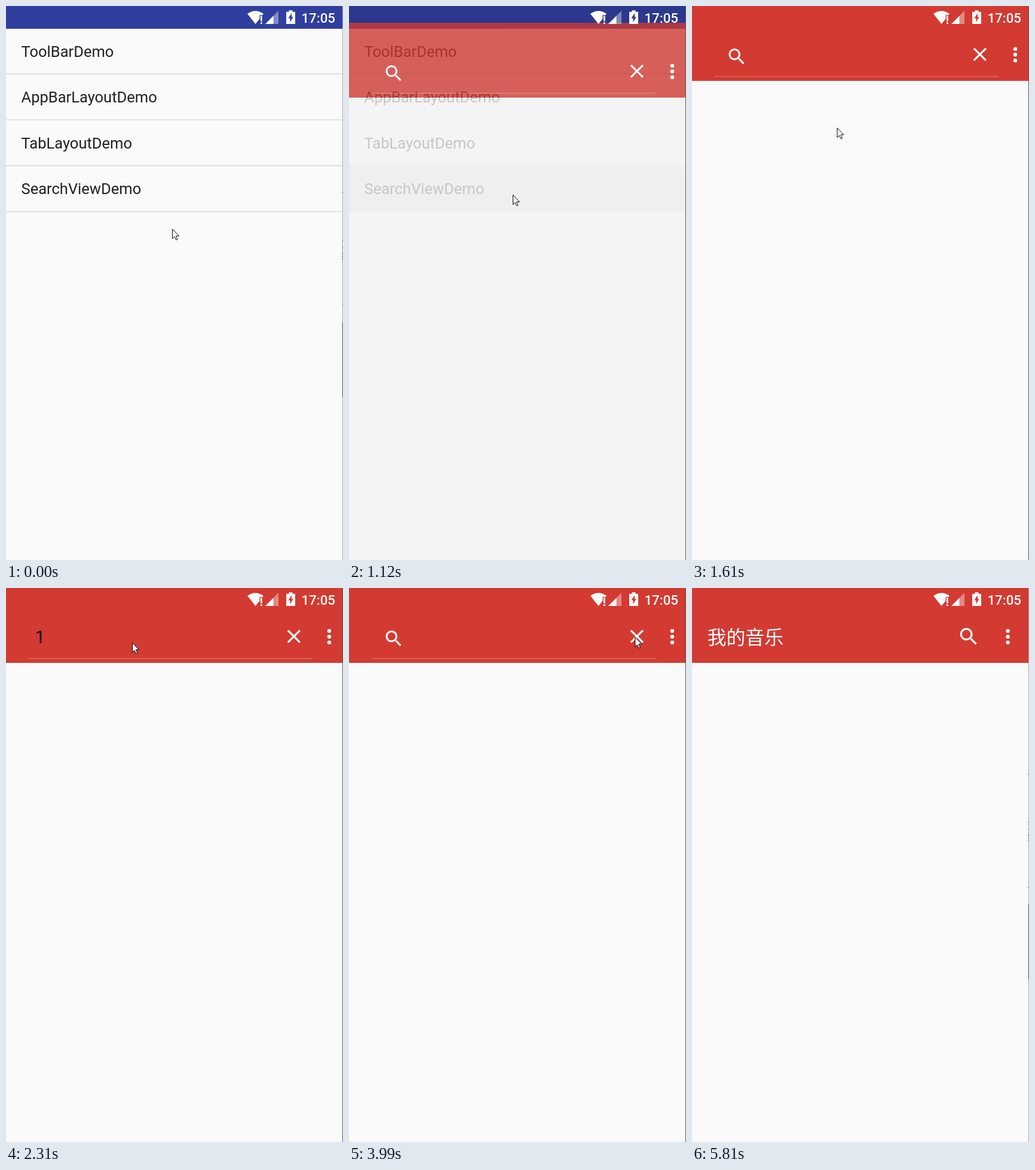
Animation of 564 by 925 pixels, one loop 5.88 s. Source, as an HTML page:

```html
<!DOCTYPE html>
<html lang="en">
<head>
<meta charset="utf-8">
<title>Search view demo</title>
<style>
  html, body { margin: 0; width: 100%; height: 100%; overflow: hidden; background: #000; }
  svg { display: block; width: 564px; height: 925px; }
  text { font-family: Roboto, sans-serif; white-space: pre; }
  .rows text { font-size: 25.53px; fill: #212121; }
  .clock { font-size: 22.3px; font-weight: 500; text-anchor: end; }
  .query { font-size: 28.7px; fill: #000; }
  .title { font-family: "Noto Sans CJK SC", "Noto Sans CJK", sans-serif; font-size: 31.9px; }
  .white { fill: #fff; }

  /* One loop is 84 ticks of 70 ms */
  .anim { animation: 5.88s step-end infinite; }

  .home { animation-name: dim; }
  @keyframes dim {
    0% { opacity: 1; }
    19.0476% { opacity: .9; }
    20.2381%, 100% { opacity: .8; }
  }

  .press { animation-name: press; }
  @keyframes press {
    0% { visibility: hidden; }
    14.2857%, 100% { visibility: visible; }
  }

  .ripple { animation-name: ripple; }
  @keyframes ripple {
    0% { r: 0; }
    14.2857% { r: 23px; }
    15.4762% { r: 95px; }
    16.6667% { r: 190px; }
    17.8571%, 100% { r: 300px; }
  }

  .screen { animation-name: enter; }
  @keyframes enter {
    0% { opacity: 0; transform: translateY(74px); }
    19.0476% { opacity: .77; transform: translateY(28px); }
    20.2381% { opacity: .97; transform: translateY(7px); }
    21.4286%, 100% { opacity: 1; transform: none; }
  }

  .field { animation-name: field; }
  @keyframes field {
    0% { visibility: visible; }
    77.381%, 100% { visibility: hidden; }
  }

  .hint { animation-name: hint; }
  @keyframes hint {
    0% { visibility: visible; }
    39.2857% { visibility: hidden; }
    64.2857% { visibility: visible; }
    77.381%, 100% { visibility: hidden; }
  }

  .d1 { animation-name: d1; }
  .d2 { animation-name: d2; }
  .d3 { animation-name: d3; }
  @keyframes d1 {
    0%, 64.2857%, 100% { visibility: hidden; }
    39.2857% { visibility: visible; }
  }
  @keyframes d2 {
    0%, 64.2857%, 100% { visibility: hidden; }
    44.0476% { visibility: visible; }
  }
  @keyframes d3 {
    0%, 64.2857%, 100% { visibility: hidden; }
    47.619% { visibility: visible; }
  }

  .closed { animation-name: closed; }
  @keyframes closed {
    0% { visibility: hidden; }
    77.381%, 100% { visibility: visible; }
  }

  .edge { animation-name: edge; }
  @keyframes edge {
    0%, 98.8095%, 100% { visibility: hidden; }
    5.9524% { visibility: visible; }
  }

  .shown { animation-name: shown; }
  @keyframes shown {
    0% { visibility: visible; }
    91.6667%, 100% { visibility: hidden; }
  }

  .cursor { animation: move 5.88s infinite; }
  @keyframes move {
    0%, 5.9524% { transform: translate(278px, 372px); animation-timing-function: steps(6, start); }
    13.0952%, 23.8095% { transform: translate(274px, 315px); animation-timing-function: steps(8, start); }
    33.3333%, 47.619% { transform: translate(211px, 91px); animation-timing-function: steps(5, start); }
    53.5714%, 54.7619% { transform: translate(465px, 90px); animation-timing-function: steps(3, start); }
    58.3333%, 59.5238% { transform: translate(470px, 90px); animation-timing-function: steps(3, start); }
    63.0952%, 64.2857% { transform: translate(473px, 86px); animation-timing-function: steps(3, start); }
    67.8571% { transform: translate(480px, 83px); animation-timing-function: steps(3, start); }
    71.4286%, 89.2857% { transform: translate(475px, 79px); animation-timing-function: steps(2, start); }
    91.6667%, 100% { transform: translate(503px, 562px); }
  }
</style>
</head>
<body>
<svg viewBox="0 0 564 925" xmlns="http://www.w3.org/2000/svg">
  <defs>
    <clipPath id="row"><rect y="267.5" width="563" height="75.5"/></clipPath>
    <path id="lens" d="M15.5 14h-.79l-.28-.27C15.41 12.59 16 11.11 16 9.5 16 5.91 13.09 3 9.5 3S3 5.91 3 9.5 5.91 16 9.5 16c1.61 0 3.09-.59 4.23-1.57l.27.28v.79l5 4.99L20.49 19l-4.99-5zm-6 0C7.01 14 5 11.99 5 9.5S7.01 5 9.5 5 14 7.01 14 9.5 11.99 14 9.5 14z"/>
    <g id="dots">
      <circle cy="71.7" r="3.2"/>
      <circle cy="81.3" r="3.2"/>
      <circle cy="90.9" r="3.2"/>
    </g>
  </defs>

  <g class="home anim">
    <rect width="564" height="925" fill="#fafafa"/>
    <rect width="564" height="38" fill="#303f9f"/>
    <g clip-path="url(#row)">
      <rect class="press anim" y="267" width="564" height="77" fill="#f3f3f3"/>
      <circle class="ripple anim" cx="274" cy="314" r="0" fill="#e6e6e6"/>
    </g>
    <path d="M0 113.4H564M0 190H564M0 266.6H564M0 343.2H564" stroke="#dadada" stroke-width="1.6"/>
    <g class="rows">
      <text x="25.5" y="84.5">ToolBarDemo</text>
      <text x="25.5" y="161.1">AppBarLayoutDemo</text>
      <text x="25.5" y="237.7">TabLayoutDemo</text>
      <text x="25.5" y="314.3">SearchViewDemo</text>
    </g>
  </g>

  <g class="screen anim">
    <rect width="564" height="925" fill="#fafafa"/>
    <rect width="564" height="125" fill="#d33a31"/>
    <g class="field anim white">
      <rect x="38" y="117" width="475" height="1.2" opacity=".28"/>
      <path transform="translate(462.7 61.7) scale(1.5957)" d="M19 6.41 17.59 5 12 10.59 6.41 5 5 6.41 10.59 12 5 17.59 6.41 19 12 13.41 17.59 19 19 17.59 13.41 12z"/>
      <use href="#dots" x="541"/>
    </g>
    <g class="hint anim white"><use href="#lens" transform="translate(57 66.5) scale(1.496)"/></g>
    <text class="query" x="49" y="91.7"><tspan class="d1 anim">1</tspan><tspan class="d2 anim">2</tspan><tspan class="d3 anim">3</tspan></text>
    <g class="closed anim white">
      <text class="title" x="25.5" y="94">我的音乐</text>
      <use href="#lens" transform="translate(444 62) scale(1.5957)"/>
      <use href="#dots" x="528.6"/>
    </g>
  </g>

  <!-- Status bar -->
  <g class="white">
    <path d="M417.5 30 404 13Q417.5 3.5 431 13L429.4 15H424.5V21.5Z"/>
    <path d="M426 16h2.7v9.5h-2.7zM426 27.3h2.7v2.7h-2.7z"/>
    <path d="M434 30 456 8V30Z" opacity=".4"/>
    <path d="M434 30 447.5 16.5V30Z"/>
    <path fill-rule="evenodd" d="M469 9.7H473.5V7.2H479.5V9.7H484V30H469ZM478 12 472.4 20.6H475.4V27L480.8 18.2H478Z"/>
    <text class="clock" x="551" y="27.7">17:05</text>
  </g>

  <!-- Window border -->
  <rect x="563" width="1" height="925" fill="#a6a6a6"/>
  <path d="M563.5 310v2M563.5 390v2M563.5 402v2M563.5 411v4M563.5 417v2M563.5 421v2M563.5 499v2M563.5 528V653" stroke="#444"/>
  <rect class="edge anim" x="563" width="1" height="925" fill="#555"/>

  <g class="cursor">
    <path class="shown anim" d="M.5 .5V16.5L4 13.2 6.6 18.6 9 17.6 6.5 12H11.5Z" fill="#fff" stroke="#000"/>
  </g>
</svg>
</body>
</html>
```
